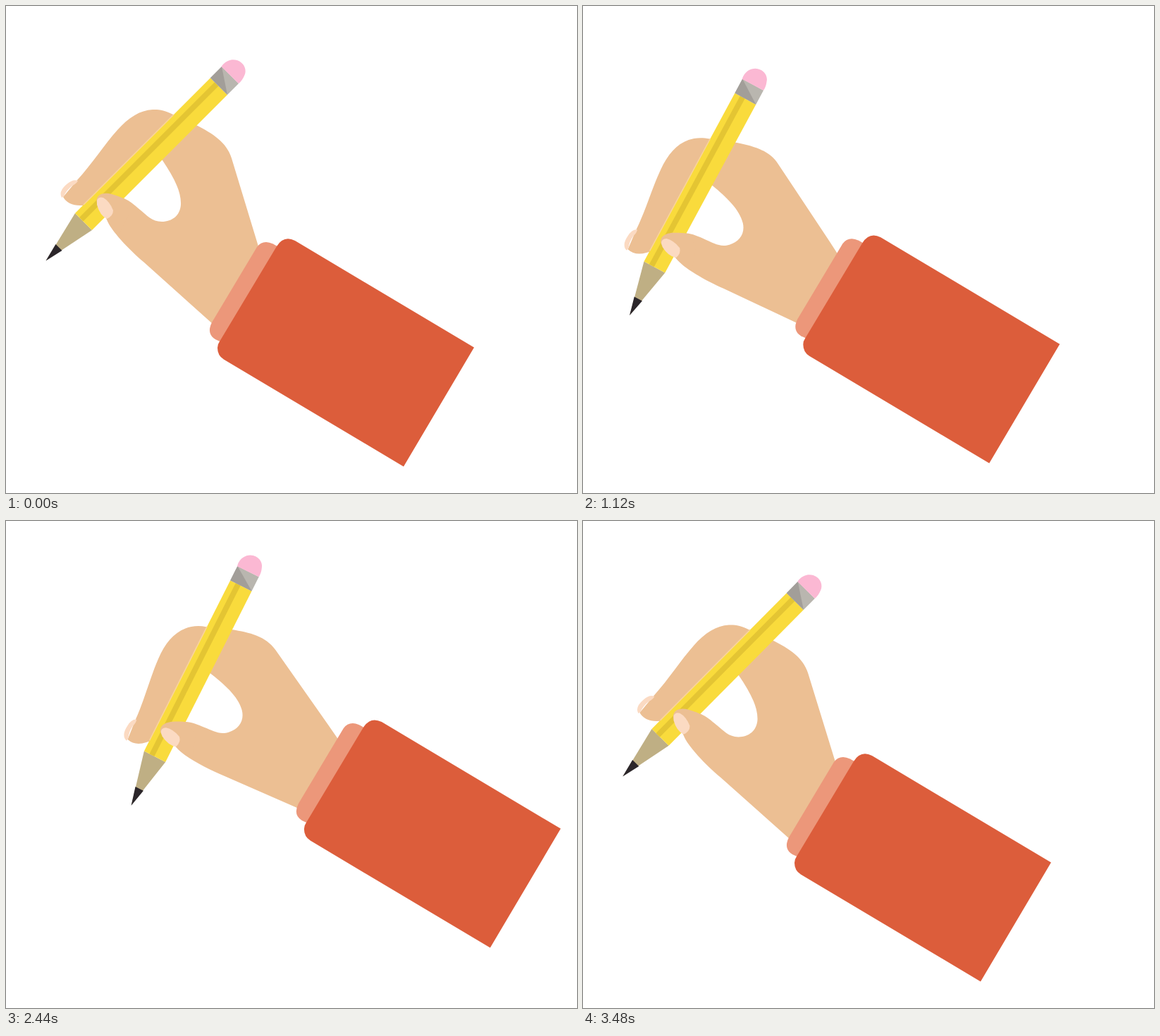
An HTML page that plays this animation: 810x691 px, repeating every 3520 ms.

```html
<!DOCTYPE html>
<html lang="en">
<head>
<meta charset="utf-8">
<title>Writing hand</title>
<style>
  html, body { margin: 0; width: 100%; height: 100%; overflow: hidden; background: #fff; }
  svg { display: block; width: 810px; height: 691px; }
  .skin { fill: #ecbf93; }
  .nail { fill: #fbdac2; }
</style>
</head>
<body>
<svg viewBox="0 0 810 691">
  <g id="arm">
    <g id="hand">
      <path class="skin" d="M365 365 L358 341 L320 216 C313 193 293 181 270 169 L237 154
        C226 148 216 146.500 208 147 C190 148 174 158 158 176 C140 196 122 224 101 247
        L81 271 Q88 283 105 283 L112 283 L135 268 L143 303 C148 318 175 346 195 363
        L292 450 L310 466 Z"/>
      <path class="nail" d="M79 272 Q74 263 86 253 Q95 245 102 248 Q100 252 94 255 Q86 261 82 270 Z"/>
      <path fill="#fff" d="M222 219 C236 240 249 262 248 282 C247 297 236 306 221 306
        C207 306 200 297 190 289 C182 282 175 276 167 273 L160 262 L215 212 Z"/>

      <!-- pencil -->
      <path fill="#bfaf84" d="M98 294 L122 318 L57 361 Z"/>
      <path fill="#2b262a" d="M70.500 338 L79.500 347 L56.500 361.500 Z"/>
      <path fill="#f9db3c" d="M98 294 L122 318 L314 126 L290 102 Z"/>
      <path fill="#e4c533" d="M104 300 L109.500 305.500 L301.500 113.500 L296 108 Z"/>
      <path stroke="#fad59a" stroke-width="1.500" d="M110 282 L238 154"/>
      <path fill="#b9b6af" d="M290 102 L314 126 L330 110 L306 86 Z"/>
      <path fill="#a29e99" d="M290 102 L314 126 L306 86 Z"/>
      <path fill="#fbb8d3" d="M305.500 86 C312 76 322 75 328 77 C339 81 342 92 338 99 Q335 106 330 110 Z"/>

      <!-- thumb -->
      <path class="skin" d="M129 280 C126 266 140 264 150 267 C160 270 165 272 169 274
        L175 295 L160 325 L143 303 Z"/>
      <path class="nail" d="M129 276 Q131 270 138 272 Q147 277 152 290 Q152 298 143 302 Q133 297 129 282 Z"/>
    </g>
    <path fill="#ec977a" d="M390 345 Q378 335 369 335 Q361 335 356 342 L292 449
      Q284 465 297 473 L308 478 Z"/>
    <path fill="#dc5d3b" d="M664 484.500 L564 653.500 L309 501.500 Q300 496 300 485 Q300 480 303 476
      L384 341 Q394 325 410 333 Z"/>
  </g>
</svg>
<script>
  const LOOP = 3520, STEP = 40;
  const arm = document.getElementById('arm');
  const hand = document.getElementById('hand');

  // [time in ms, value], eased between neighbours
  const slide = [[720, 0], [2720, 129], [3300, 0]];
  const tilt = [
    [160, 0], [760, 17], [980, 18.6], [1220, 15.5], [1400, 18.8], [1620, 16.4],
    [1830, 19], [2090, 16.5], [2385, 18.45], [2690, 15.6], [2960, 17.7], [3520, 0]
  ];

  function valueAt(keys, t) {
    const next = keys.findIndex(key => key[0] > t);
    if (next === 0) return keys[0][1];
    if (next < 0) return keys[keys.length - 1][1];
    const [t0, v0] = keys[next - 1], [t1, v1] = keys[next];
    const ease = (1 - Math.cos(Math.PI * (t - t0) / (t1 - t0))) / 2;
    return v0 + (v1 - v0) * ease;
  }

  function draw() {
    const now = performance.now() % LOOP;
    const t = Math.floor(now / STEP) * STEP;
    const x = valueAt(slide, t);
    // the first pose is held until 200 ms
    const angle = t < 200 ? 0 : valueAt(tilt, t);
    arm.setAttribute('transform', `translate(${x} ${-0.39 * x})`);
    hand.setAttribute('transform', `rotate(${-angle} 336.5 412)`);
    requestAnimationFrame(draw);
  }
  draw();
</script>
</body>
</html>
```
